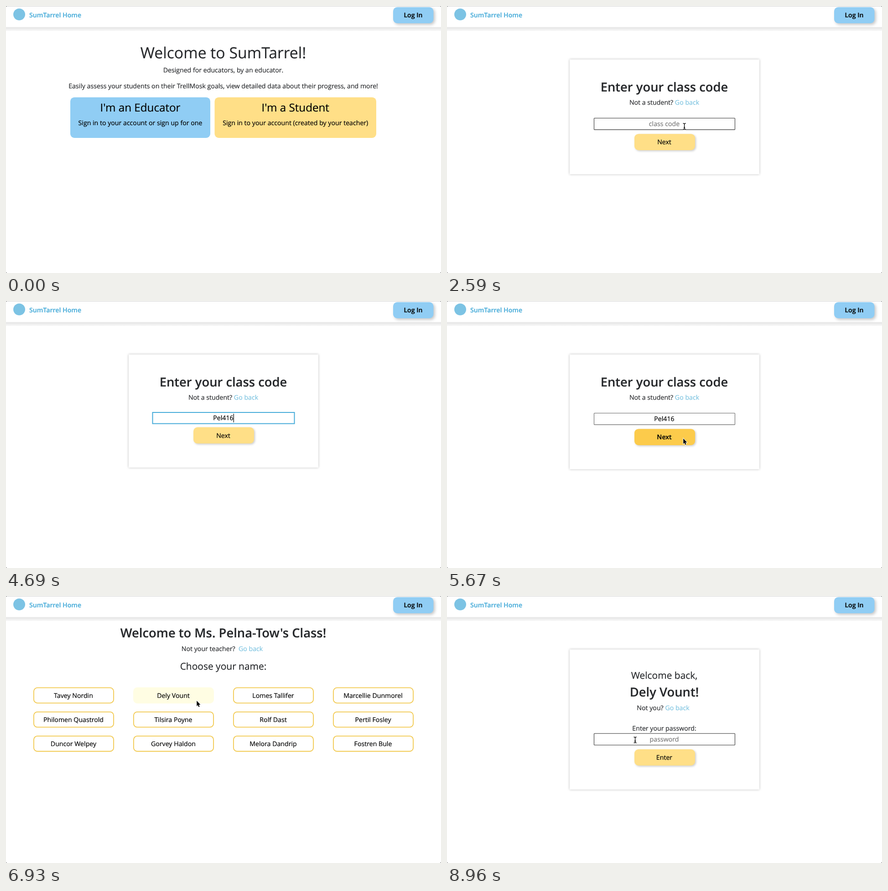
Recreate the animation shown at these times as an HTML page. Size 954 by 587 pixels, loop 9.1 s.

```html
<!DOCTYPE html>
<html lang="en">
<head>
<meta charset="utf-8">
<title>Class sign-in</title>
<style>
  html, body { margin: 0; width: 100%; height: 100%; overflow: hidden; background: #fff; }
  svg { display: block; width: 954px; height: 587px; }
  text {
    font-family: "Open Sans", "Noto Sans", sans-serif; text-anchor: middle; white-space: pre;
    text-rendering: geometricPrecision; stroke-width: .2px;
  }
  .card { fill: #fff; filter: drop-shadow(0 0 2.5px #bbb); }
  .raised { filter: drop-shadow(2px 2px 2px #ccc); }
  .login { filter: drop-shadow(3.5px 3.5px 3px #c4c4c4); }
</style>
</head>
<body>
<svg id="stage" viewBox="0 0 954 587" xmlns="http://www.w3.org/2000/svg"></svg>
<script>
const LOOP = 9100, TICK = 70, MID = 476.5;
const BODY = 14.17, H1 = 33.79, H2 = 27.36, H3 = 24.2, H4 = 20.93;
const INK = '#26282b', BLUE = '#90cdf4', BRAND = '#48acd9', LINK = '#7cc3e0';
const YELLOW = '#ffdf87', GOLD = '#fccb4b', OUTLINE = '#f2c94f', PALE = '#fffde3';

const stage = document.getElementById('stage');
const pen = document.createElement('canvas').getContext('2d');

const students = [
  'Tavey Nordin', 'Dely Vount', 'Lomes Tallifer', 'Marcellie Dunmorel',
  'Philomen Quastrold', 'Tilsira Poyne', 'Rolf Dast', 'Pertil Fosley',
  'Duncor Welpey', 'Gorvey Haldon', 'Melora Dandrip', 'Fostren Bule'
];

// [time, characters typed]
const typing = [[3570, 1], [3640, 2], [3850, 3], [4340, 4], [4480, 5], [4690, 6]];
const CODE = 'Pel416';

// [time, x, y] of the pointer
const track = [
  [280, 470, 506], [630, 540, 258], [1050, 540, 258], [1120, 525, 264],
  [1820, 525, 264], [2590, 520, 264], [5110, 520, 264], [5390, 518, 302],
  [6300, 518, 302], [6930, 418, 230], [7140, 390, 213], [8260, 390, 213], [8750, 412, 316]
];

const within = (t, from, to) => t >= from && t < to;

function pointerAt(t) {
  if (t < 280 || within(t, 3570, 5110)) return null;
  const next = track.findIndex(key => key[0] > t);
  if (next < 0) return track[track.length - 1].slice(1);
  const [t0, x0, y0] = track[next - 1], [t1, x1, y1] = track[next];
  const p = (t - t0) / (t1 - t0), k = p * p * (3 - 2 * p);
  return [x0 + (x1 - x0) * k, y0 + (y1 - y0) * k];
}

const hit = (p, x, y, w, h) => !!p && p[0] >= x && p[0] <= x + w && p[1] >= y && p[1] <= y + h;

const paint = color => `fill="${color}" stroke="${color}"`;
const text = (x, y, size, str, color = INK, extra = '') =>
  `<text x="${x}" y="${y}" font-size="${size}" ${paint(color)} ${extra}>${str}</text>`;
const bold = (x, y, size, str, color = INK, extra = '') =>
  text(x, y, size, str, color, 'font-weight="600" ' + extra);
const box = (x, y, w, h, r, fill, extra = '') =>
  `<rect x="${x}" y="${y}" width="${w}" height="${h}" rx="${r}" fill="${fill}" ${extra}/>`;
const back = (x, y, str) => text(x, y, BODY, `${str}<tspan ${paint(LINK)}>Go back</tspan>`);

function header() {
  return `<defs><linearGradient id="shade" x2="0" y2="1">
      <stop stop-color="#e4e4e4"/><stop offset="1" stop-color="#f9f9f9"/></linearGradient></defs>`
    + box(0, 0, 954, 587, 0, '#fff')
    + box(0, 46.5, 954, 8.5, 0, 'url(#shade)')
    + box(0, 0, 954, 1, 0, '#d4d4d4')
    + '<circle cx="29" cy="18.5" r="13" fill="#7cc3e4"/>'
    + bold(51, 25.3, BODY, 'SumTarrel Home', BRAND, 'style="text-anchor:start"')
    + box(849, 2.5, 88.5, 35.5, 9, BLUE, 'class="login"')
    + bold(893, 25.3, BODY, 'Log In', '#000')
    + '<path d="M0 0h2L0 2zM954 0h-2l2 2zM0 587h2l-2-2zM954 587h-2l2-2z" fill="#777"/>';
}

const card = height => `<rect class="card" x="269" y="117.5" width="416" height="${height}"/>`;

function button(y, label, hover) {
  const write = hover ? bold : text;
  return box(411, y, 133, 35.7, 9, hover ? GOLD : YELLOW, 'class="raised"')
    + write(MID, y + 23.2, BODY, label, '#000');
}

function field(y, value, placeholder, focused, hover) {
  const top = focused ? y - 1.8 : y;
  const frame = focused
    ? box(321.5, top + .8, 311, 24.6, 0, '#fff', `stroke="${BRAND}" stroke-width="2"`)
    : box(322.5, top + .5, 309, 25.4, 1, '#fff', `stroke="${hover ? '#333' : '#666'}" stroke-width="1.1"`);
  const content = text(MID, top + 18.2, BODY, value || placeholder, value ? '#000' : '#757575');
  if (!focused) return frame + content;
  pen.font = `${BODY}px "Open Sans", "Noto Sans", sans-serif`;
  const caret = MID + pen.measureText(value).width / 2;
  return frame + content + box(caret, top + 3.6, 1.2, 19, 0, '#000');
}

function choice(x, w, fill, title, note) {
  const mid = x + w / 2;
  return box(x, 200.7, w, 89.3, 9, fill)
    + text(mid, 232.4, H3, title, '#000') + text(mid, 261.5, BODY, note, '#000');
}

function homePage() {
  return text(MID, 115.2, H1, 'Welcome to SumTarrel!')
    + text(MID, 145.8, BODY, 'Designed for educators, by an educator.')
    + text(MID, 181.2, BODY, 'Easily assess your students on their TrellMosk goals, view detailed data about their progress, and more!')
    + choice(141, 307, BLUE, "I'm an Educator", 'Sign in to your account or sign up for one')
    + choice(457.5, 354.5, YELLOW, "I'm a Student", 'Sign in to your account (created by your teacher)');
}

function codePage(t, p) {
  const focused = within(t, 3080, 5670);
  const typed = typing.filter(key => t >= key[0]).length;
  const lift = focused ? 3.6 : 0;
  return card(252.3 - lift)
    + bold(MID, 188.3, H2, 'Enter your class code')
    + back(MID, 217.4, 'Not a student? ')
    + field(246, CODE.slice(0, typed), 'class code', focused, hit(p, 322, 246, 310, 26))
    + button(281.2 - lift, 'Next', hit(p, 411, 278, 133, 36));
}

function studentButton(name, i, p) {
  const x = 60 + i % 4 * 219, y = 200.8 + Math.floor(i / 4) * 53.1;
  const hover = hit(p, x, y, 177, 35.4);
  return box(x + .9, y + .9, 175.2, 33.6, 8, hover ? PALE : '#fff',
      `stroke="${hover ? PALE : OUTLINE}" stroke-width="1.8"`)
    + text(x + 88, y + 23, BODY, name, '#000');
}

function classPage(t, p) {
  return bold(MID, 91.3, H2, "Welcome to Ms. Pelna-Tow's Class!")
    + back(474, 121.3, 'Not your teacher?  ')
    + text(MID, 162, H4, 'Choose your name:')
    + students.map((name, i) => studentButton(name, i, p)).join('');
}

function passwordPage(t, p) {
  return card(308)
    + text(MID, 182.2, H4, 'Welcome back,')
    + bold(MID, 220.5, H2, students[1] + '!')
    + back(474, 251.2, 'Not you? ')
    + text(MID, 296.3, BODY, 'Enter your password:')
    + field(301.8, '', 'password', false, hit(p, 322, 302, 310, 26))
    + button(337, 'Enter', hit(p, 411, 337, 133, 36));
}

function pointer(t, p, page) {
  if (!p) return '';
  const [x, y] = p;
  const inField = page === codePage && hit(p, 322, 245, 310, 27)
    || page === passwordPage && hit(p, 322, 302, 310, 26);
  if (inField) {
    const beam = 'M-3 -6.5Q0 -6.5 0 -4.5Q0 -6.5 3 -6.5M0 -5V5M-3 6.5Q0 6.5 0 4.5Q0 6.5 3 6.5M-1.6 2.5H1.6';
    return `<g transform="translate(${x + .6} ${y + .5})" fill="none">
      <path d="${beam}" stroke="#fff" stroke-width="2.6" opacity=".7"/><path d="${beam}" stroke="#000" stroke-width="1.3"/></g>`;
  }
  const pressed = within(t, 1120, 1820) || within(t, 7420, 7840);
  const ring = pressed
    ? '<g fill="none"><circle cx=".6" cy="1" r="17.6" stroke="#fff" stroke-width="5.6" opacity=".75"/><circle cx=".6" cy="1" r="17.6" stroke="#000" stroke-width="2.7"/></g>'
    : '';
  return `<g transform="translate(${x} ${y})">${ring}
    <path d="M.3 .3V12.2L2.8 9.8L4.6 14L6.6 13.2L4.9 9H8.4Z" stroke="#fff" stroke-width="1.6" paint-order="stroke"/></g>`;
}

function scene(t) {
  const p = pointerAt(t);
  const page = t < 1820 ? homePage : t < 5740 ? codePage : t < 7840 ? classPage : passwordPage;
  return header() + page(t, p) + pointer(t, p, page);
}

const start = performance.now();
let shown = -1;

function draw() {
  const t = Math.floor((performance.now() - start) % LOOP / TICK) * TICK;
  if (t !== shown) {
    stage.innerHTML = scene(t);
    shown = t;
  }
  requestAnimationFrame(draw);
}
draw();
</script>
</body>
</html>
```
